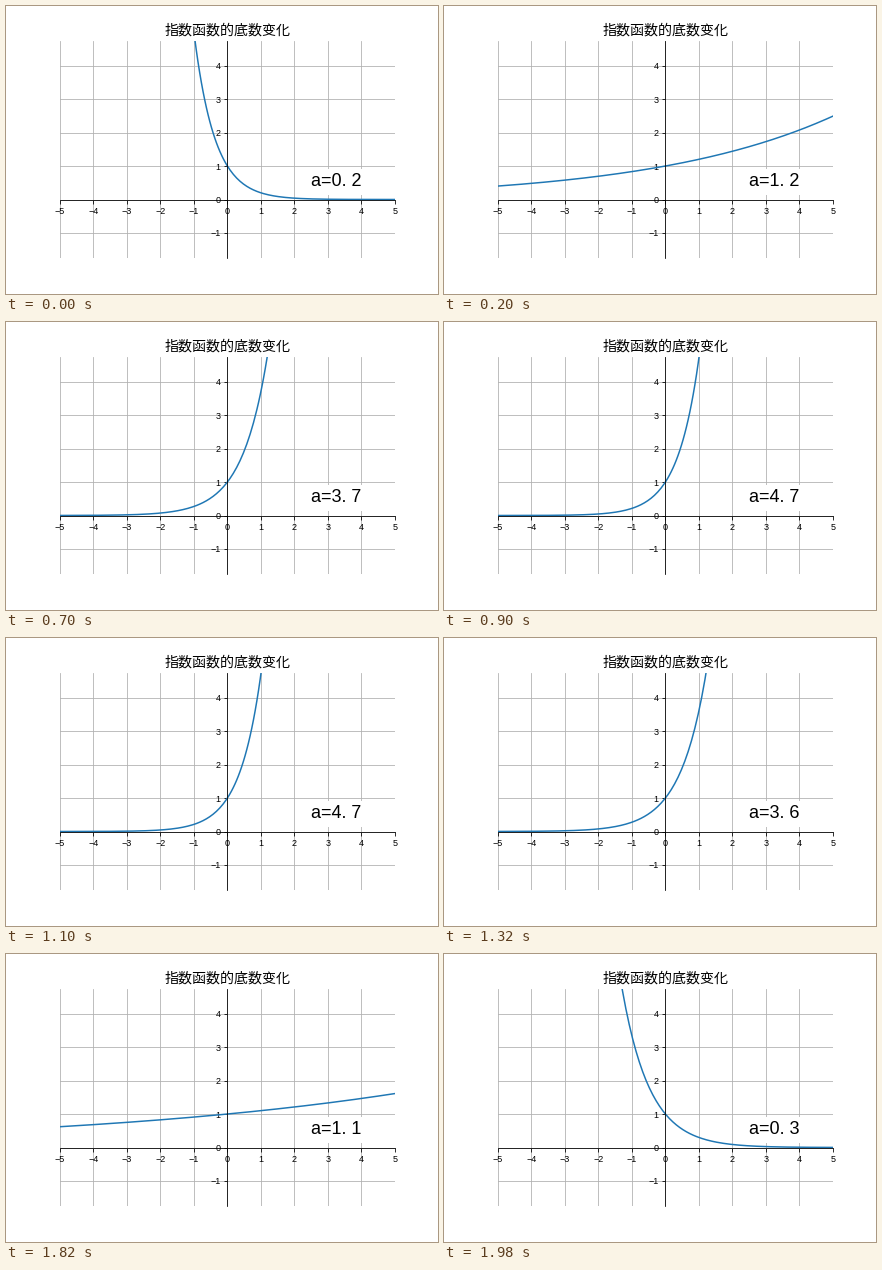
These frames come from a looping animation (432x288 px, 2000 ms). A matplotlib script:

```python
import matplotlib.pyplot as plt
import numpy as np
from matplotlib.animation import FuncAnimation

FRAMES = 100
STEP = 0.1
LOW = 0.2

plt.rcParams["font.family"] = "Liberation Sans"
plt.rcParams["axes.unicode_minus"] = True

fig, ax = plt.subplots(figsize=(6, 4), dpi=72)
fig.subplots_adjust(left=0.125, right=0.9, bottom=0.125, top=0.88)

# Same scale on both axes, with y centred on 1.5
half = 0.5 * 10 * (0.755 * 4) / (0.775 * 6)
ax.set_xlim(-5, 5)
ax.set_ylim(1.5 - half, 1.5 + half)
ax.set_xticks(range(-5, 6))
ax.set_yticks(range(-1, 5))
ax.tick_params(labelsize=9)
ax.grid(True)
ax.set_title("指数函数的底数变化", family="Noto Sans CJK JP", size=14)

for side in ("top", "right"):
    ax.spines[side].set_visible(False)
for side in ("left", "bottom"):
    ax.spines[side].set_position(("data", 0))

x = np.linspace(-5, 5, 200)
curve, = ax.plot(x, LOW ** x)
label = ax.text(2.5, 0.4, "", size=18, backgroundcolor="white")


def base(i):
    """Rise by one step per frame for half the loop, then fall back."""
    return LOW + STEP * min(i, FRAMES - i)


def update(i):
    a = base(i)
    curve.set_ydata(a ** x)
    label.set_text(f"a={a:.1f}".replace(".", ". "))
    return curve, label


anim = FuncAnimation(fig, update, frames=FRAMES, interval=20, repeat=True, repeat_delay=0)
plt.show()
```
